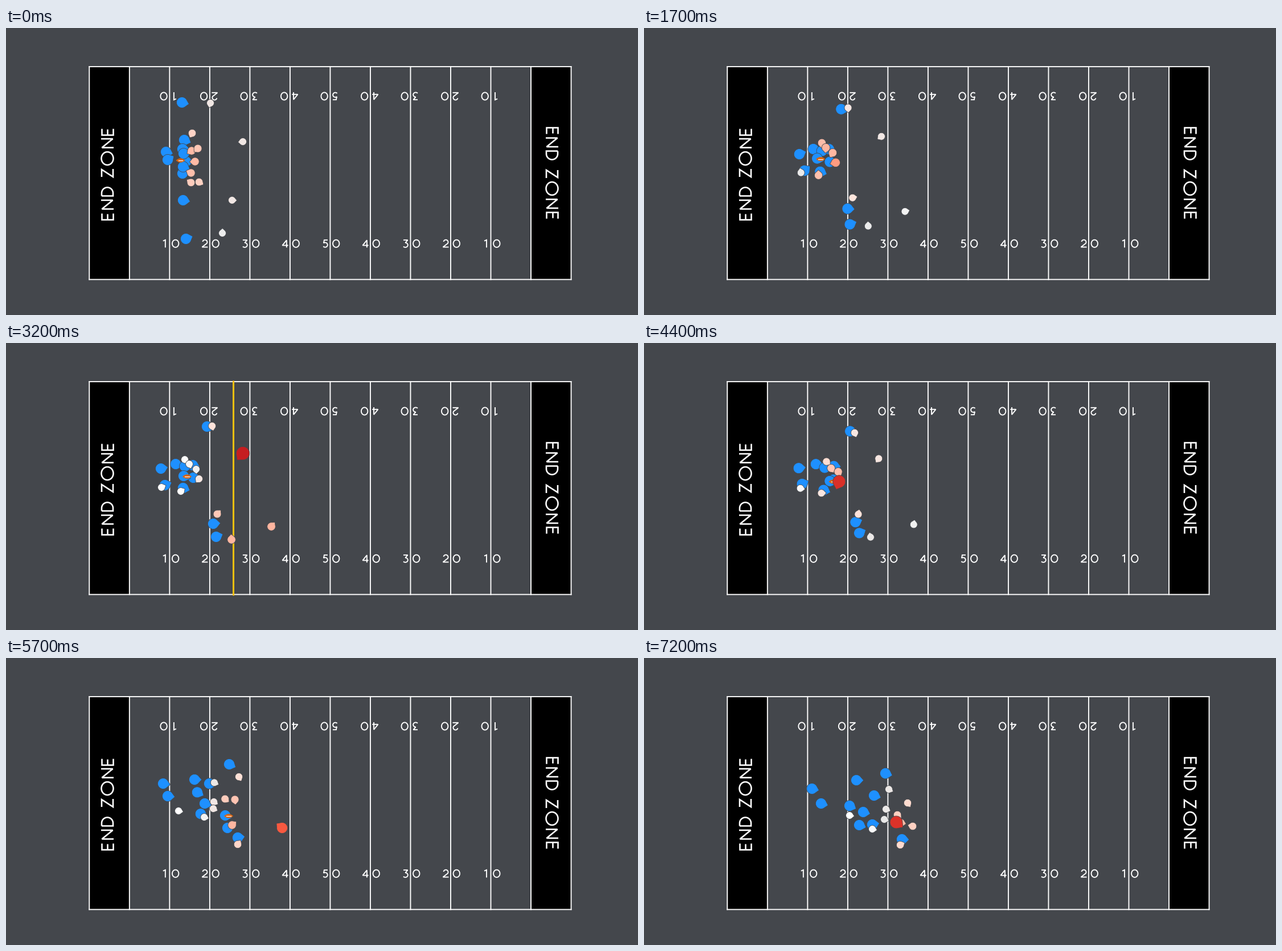
A matplotlib script that plays this animation: 1110x505 px, repeating every 7300 ms.

```python
import numpy as np
import matplotlib.pyplot as plt
from matplotlib.animation import FuncAnimation
from matplotlib.collections import PolyCollection
from matplotlib.colors import LinearSegmentedColormap
from matplotlib.patches import Rectangle

W, H, DPI = 1110, 505, 100
FRAMES, INTERVAL = 73, 100
PX = 72 / DPI
BG, BLUE, GOLD, ORANGE = "#44474c", "#1e90ff", "#fcc010", "#d9640f"
LEFT, TOP, BOTTOM, TEN_YARDS = 146.3, 68, 442.5, 70.52

# The play pauses while the gold line sweeps down the field.
SCAN_START, SCAN_END, SCAN_X = 20, 40, 314
HANDOFF, CARRY = 10, 15
ROUTE_TIMES = {3: np.array([0, 20, 52]), 4: np.array([0, 20, 37, 52])}

HEAT = LinearSegmentedColormap.from_list("heat", [
    (0, "#ffffff"), (.06, "#e8e8e8"), (.12, "#ffe6de"), (.25, "#ffcbba"),
    (.4, "#ffa88f"), (.6, "#ff7050"), (.8, "#f24632"), (1, "#b9121b")])

fig = plt.figure(figsize=(W / DPI, H / DPI), dpi=DPI, facecolor=BG)
ax = fig.add_axes([0, 0, 1, 1])
ax.set(xlim=(0, W), ylim=(H, 0))
ax.axis("off")


def arc(cx, cy, rx, ry, start, stop):
    t = np.radians(np.linspace(start, stop, 40))
    return np.column_stack([cx + rx * np.cos(t), cy + ry * np.sin(t)])


def stroke(*parts):
    return np.vstack([np.asarray(p, float).reshape(-1, 2) for p in parts])


# Digits sit in a box 14 px high, centred on x = 0.
DIGITS = {
    "0": [arc(0, 7, 5.7, 6.6, 0, 360)],
    "1": [stroke((-3, 2.4), (1, .6), (1, 14))],
    "2": [stroke(arc(0, 4.4, 4, 4, 190, 395), (-5, 13.2), (5, 13.2))],
    "3": [stroke((-4, .8), (3.6, .8), (-.6, 5.6), arc(-.6, 9.6, 4.4, 4, -90, 140))],
    "4": [stroke((2.4, 14), (2.4, 1), (-5, 10.2), (5.2, 10.2))],
    "5": [stroke((4, .8), (-2, .8), (-3, 6.2), arc(-.4, 9.3, 4.2, 4.1, -125, 140))],
}

# Letters are 22 px high, starting at x = 0.
LETTERS = {
    "E": [stroke((12, 1), (1, 1), (1, 21), (12, 21)), stroke((1, 10.5), (11, 10.5))],
    "N": [stroke((1, 22), (1, 1.5), (16.5, 20.5), (16.5, 0))],
    "D": [stroke((1, 1), (5, 1), arc(6, 11, 10, 10, -90, 90), (1, 21), (1, 1))],
    "Z": [stroke((1, 1), (14, 1), (1, 21), (15, 21))],
    "O": [arc(12, 11, 11.5, 10.5, 0, 360)],
}
LETTER_GAP, WORD_GAP = 6.5, 11


def draw_strokes(strokes, place, width):
    for points in strokes:
        x, y = place(points[:, 0], points[:, 1])
        ax.plot(x, y, color="white", lw=width * PX, zorder=2,
                solid_capstyle="butt", solid_joinstyle="miter")


def draw_number(tens, line_x):
    for digit, offset in ((tens, -8.5), ("0", 10.3)):
        draw_strokes(DIGITS[digit], lambda x, y: (line_x + offset + x, 372.3 + y), 1.9)
        draw_strokes(DIGITS[digit], lambda x, y: (line_x - offset - x, 127 - y), 1.9)


def draw_end_zones(text):
    s = 0
    for letter in text:
        if letter == " ":
            s += WORD_GAP
            continue
        glyph = LETTERS[letter]
        draw_strokes(glyph, lambda x, y: (167 + y, 338 - s - x), 2.6)
        draw_strokes(glyph, lambda x, y: (970 - y, 174 + s + x), 2.6)
        s += max(part[:, 0].max() for part in glyph) + LETTER_GAP


def draw_field():
    for x in (LEFT, LEFT + 11 * TEN_YARDS):
        ax.add_patch(Rectangle((x, TOP), TEN_YARDS, BOTTOM - TOP, fc="black", zorder=0))
    edge = dict(color="white", lw=1.9 * PX, zorder=1, snap=False,
                solid_capstyle="projecting")
    for k in range(13):
        x = LEFT + k * TEN_YARDS
        ax.plot([x, x], [TOP, BOTTOM], **edge)
    for y in (TOP, BOTTOM):
        ax.plot([LEFT, LEFT + 12 * TEN_YARDS], [y, y], **edge)
    for k in range(1, 10):
        draw_number(str(5 - abs(5 - k)), LEFT + (k + 1) * TEN_YARDS)
    draw_end_zones("END ZONE")


class Player:
    """Runs a smooth route; a focus (time, strength) draws extra influence."""

    def __init__(self, *route, focus=(0, 0)):
        self.route = np.array(route, float)
        self.times = ROUTE_TIMES[len(route)]
        self.slopes = np.gradient(self.route, self.times, axis=0)
        self.focus = focus

    def at(self, u):
        last = len(self.times) - 2
        i = np.clip(np.searchsorted(self.times, u, side="right") - 1, 0, last)
        h = self.times[i + 1] - self.times[i]
        t = (u - self.times[i]) / h
        p, m = self.route, self.slopes * h
        return ((1 + 2 * t) * (1 - t) ** 2 * p[i] + t * (1 - t) ** 2 * m[i]
                + t * t * (3 - 2 * t) * p[i + 1] + t * t * (t - 1) * m[i + 1])

    def outline(self, u, radius, facing):
        """Disc with a beak turned by both the run and the facing direction."""
        look = 5 * (self.at(u + .1) - self.at(u - .1)) + 1.5 * facing
        heading = np.arctan2(look[1], look[0])
        t = np.radians(np.linspace(36, 324, 60)) + heading
        ring = radius * np.column_stack([np.cos(t), np.sin(t)])
        tip = 1.34 * radius * np.array([[np.cos(heading), np.sin(heading)]])
        return self.at(u) + np.vstack([ring, tip])

    def weight(self, u, target):
        """Closeness to the target; a target that has run past counts as far."""
        dx, dy = self.at(u) - target
        closeness = np.exp(-np.hypot(dx if dx > 0 else 4 * dx, dy) / 65)
        time, strength = self.focus
        return closeness * (1 + strength * np.exp(-((u - time) / 6) ** 2))


carrier = Player((281, 218), (312, 234), (385, 277), (443, 290))
quarterback = Player((284, 232), (272, 221), (276, 221), (295, 230))

offense = [
    Player((316, 235), (329, 237), (349, 256), (385, 271)),
    Player((313, 197), (328, 215), (357, 221), (404, 242)),
    Player((310, 213), (298, 213), (373, 215)),
    Player((310, 256), (279, 250), (284, 243), (311, 256)),
    Player((312, 221), (314, 217), (361, 260)),
    carrier,
    Player((311, 244), (311, 255), (378, 294)),
    quarterback,
    Player((309, 131), (353, 147), (392, 187), (424, 203)),
    Player((311, 303), (364, 318), (389, 299), (401, 293)),
    Player((316, 371), (369, 341), (407, 316), (453, 319)),
]

defense = [
    Player((359, 132), (362, 146), (409, 209), (463, 255)),
    Player((327, 185), (314, 205), (430, 231)),
    Player((326, 216), (322, 213), (365, 253), (425, 266)),
    Player((337, 212), (334, 222), (445, 276)),
    Player((332, 235), (339, 239), (364, 265), (422, 284), focus=(24, 1.5)),
    Player((325, 255), (307, 261), (401, 301)),
    Player((325, 272), (273, 254), (303, 269), (361, 277)),
    Player((339, 271), (371, 301), (397, 294), (451, 290)),
    Player((397, 303), (466, 323), (485, 299), (472, 296), focus=(37, 6)),
    Player((380, 361), (396, 346), (407, 328), (450, 329)),
    Player((416, 200), (416, 194), (402, 249), (443, 289), focus=(52, 3)),
]

SNAP_SPOT = np.array([306.5, 233])
IN_HAND = np.array([6, 1])
DOWNFIELD = np.array([1, 0])


def ball_at(u):
    """Snap to the quarterback, then hand off to the carrier."""
    held, carried = quarterback.at(u) + IN_HAND, carrier.at(u) + IN_HAND
    if u < HANDOFF:
        return SNAP_SPOT + (held - SNAP_SPOT) * u / HANDOFF
    return held + (carried - held) * min((u - HANDOFF) / (CARRY - HANDOFF), 1)


def play_time(frame):
    if frame < SCAN_START:
        return frame
    return max(SCAN_START, frame - (SCAN_END - SCAN_START))


draw_field()
scan_line, = ax.plot([], [], color=GOLD, lw=3 * PX, zorder=3, solid_capstyle="butt")
offense_marks = PolyCollection([], facecolors=BLUE, edgecolors=BG, linewidths=.8 * PX, zorder=4)
ball_mark = PolyCollection([], facecolors=ORANGE, zorder=5)
lace, = ax.plot([], [], color="white", lw=1.2 * PX, zorder=6)
defense_marks = PolyCollection([], edgecolors=BG, linewidths=.8 * PX, zorder=7)
for marks in (offense_marks, ball_mark, defense_marks):
    ax.add_collection(marks, autolim=False)

s = np.linspace(-1, 1, 21)
LENS = np.vstack([np.column_stack([side * 8 * s, side * 3.7 * (1 - s ** 2)])
                  for side in (1, -1)])


def update(frame):
    u = play_time(frame)
    ball = ball_at(u)
    scanning = SCAN_START <= frame < SCAN_END
    scan_x = SCAN_X + TEN_YARDS / 10 * (frame - SCAN_START)
    target = np.array([scan_x, ball[1]]) if scanning else ball

    weights = np.array([p.weight(u, target) for p in defense])
    influence = np.minimum(2.2 * weights / weights.sum(), 1)
    outlines = []
    for player, v in zip(defense, influence):
        to_ball = ball - player.at(u)
        facing = to_ball / np.hypot(*to_ball)
        outlines.append(player.outline(u, 6.4 + 5.8 * v ** 1.8, facing))
    defense_marks.set_verts(outlines)
    defense_marks.set_facecolor(HEAT(influence))
    offense_marks.set_verts([p.outline(u, 9.5, DOWNFIELD) for p in offense])

    ball_mark.set_verts([ball + LENS])
    lace.set_data(ball[0] + np.array([-3.8, 3.8]), [ball[1]] * 2)
    scan_line.set_data([scan_x] * 2, [66, 444])
    scan_line.set_visible(scanning)
    return scan_line, offense_marks, ball_mark, lace, defense_marks


anim = FuncAnimation(fig, update, frames=FRAMES, interval=INTERVAL,
                     repeat=True, repeat_delay=0, blit=False)
plt.show()
```
